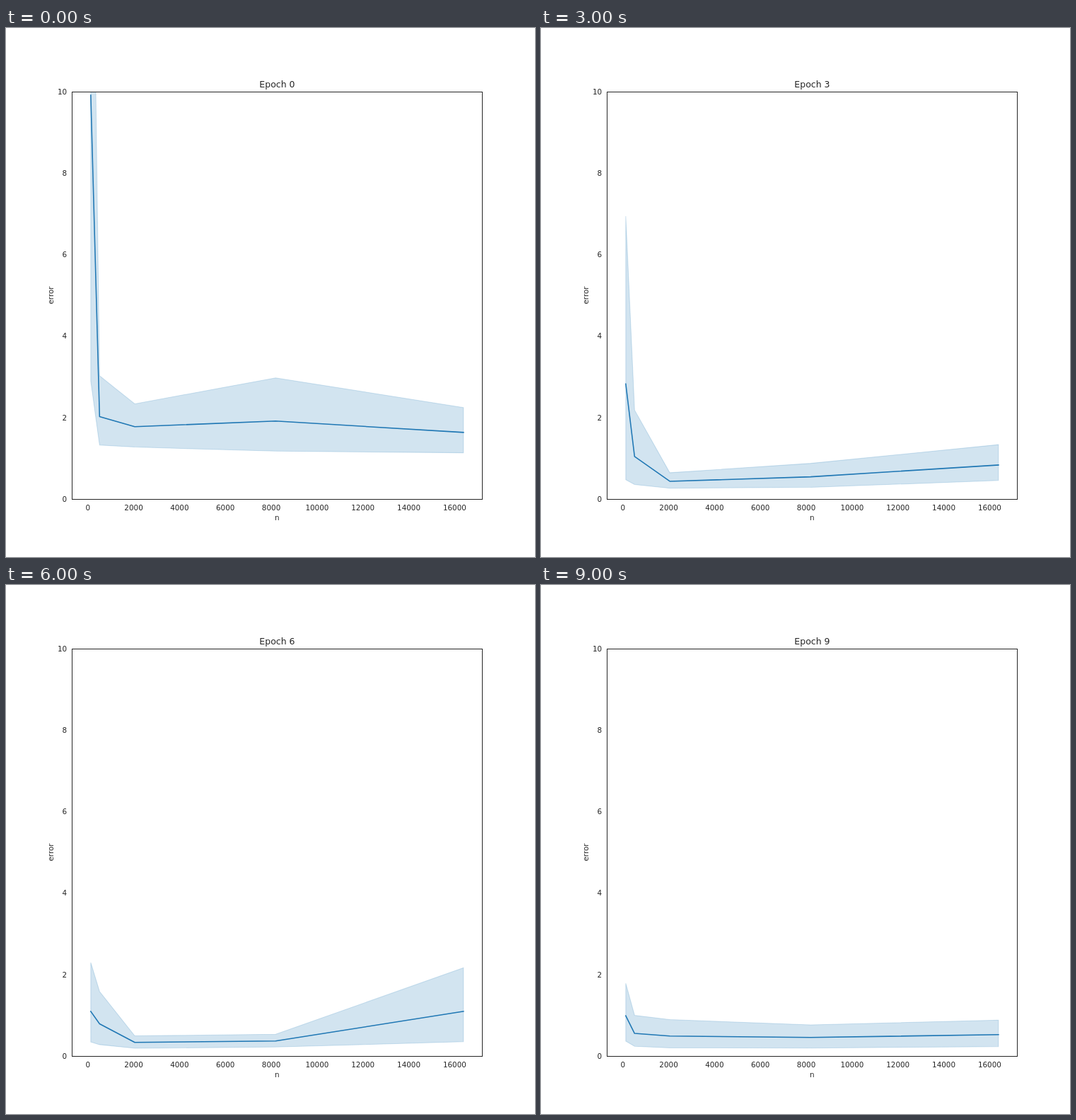
An HTML page for the animation above (10 s loop, 748 by 748 pixels).

```html
<!DOCTYPE html>
<html lang="en">
<head>
<meta charset="utf-8">
<title>Error by n</title>
<style>
  html, body { margin: 0; width: 100%; height: 100%; overflow: hidden; background: #fff; }
  svg { display: block; width: 100vw; height: 100vh; }
  text { font: 10.39px "DejaVu Sans", sans-serif; fill: #262626; text-anchor: middle; }
  text.y { text-anchor: end; }
  #title { font-size: 12.47px; }
  #band { fill: #1f77b4; stroke: #1f77b4; stroke-width: 1.04; fill-opacity: .2; stroke-opacity: .2; }
  #line { fill: none; stroke: #1f77b4; stroke-width: 1.56; stroke-linecap: square; stroke-linejoin: round; }
  #frame { fill: none; stroke: #262626; stroke-width: 1; }
</style>
</head>
<body>
<svg viewBox="0 0 748 748">
  <clipPath id="plot"><rect x="93.5" y="90" width="580" height="576"/></clipPath>
  <g clip-path="url(#plot)">
    <path id="band"/>
    <path id="line"/>
  </g>
  <rect id="frame" x="93.5" y="90.5" width="580" height="576"/>
  <g id="labels"></g>
  <text id="title" x="383.4" y="83.6"></text>
</svg>
<script>
const STEP = 1000;
const sizes = [128, 512, 2048, 8192, 16384];

// Per epoch: mean, upper bound and lower bound at each size.
const epochs = {
  0: { mean: [9.91, 2.02, 1.77, 1.91, 1.63], high: [19.5, 3.02, 2.33, 2.97, 2.24], low: [2.89, 1.32, 1.27, 1.17, 1.13] },
  1: { mean: [4.82, .89, 1.47, .72, 1.19], high: [10.7, 1.4, 2.82, 1.05, 2.25], low: [1.32, .515, .63, .45, .59] },
  2: { mean: [3.7, .97, .85, .62, 1], high: [8.7, 1.8, 1.5, .95, 1.75], low: [.8, .42, .36, .31, .5] },
  3: { mean: [2.82, 1.04, .43, .54, .83], high: [6.94, 2.18, .64, .87, 1.33], low: [.47, .35, .26, .28, .45] },
  4: { mean: [2.39, 2.53, .37, .695, 2.1], high: [5.38, 6.56, .55, 1.33, 4.89], low: [.42, .32, .22, .26, .335] },
  6: { mean: [1.09, .785, .33, .365, 1.09], high: [2.29, 1.58, .49, .53, 2.16], low: [.34, .275, .185, .215, .345] },
  7: { mean: [.915, 1.28, .345, .36, 2.245], high: [1.75, 3.01, .52, .54, 5.56], low: [.325, .29, .18, .2, .31] },
  9: { mean: [.985, .55, .485, .45, .52], high: [1.78, .995, .89, .76, .875], low: [.36, .235, .195, .19, .225] }
};

const average = (a, b) => a.map((v, i) => (v + b[i]) / 2);
const between = (a, b) => ({
  mean: average(a.mean, b.mean),
  high: average(a.high, b.high),
  low: average(a.low, b.low)
});
epochs[5] = between(epochs[4], epochs[6]);
epochs[8] = between(epochs[7], epochs[9]);

const byId = id => document.getElementById(id);
const px = n => 115.7 + n * .032419;
const py = error => 665.72 - error * 57.596;
const points = values => values.map((v, i) => [px(sizes[i]), py(v)]);
const path = list => "M" + list.map(p => p.map(c => c.toFixed(2)).join()).join("L");

function label(text, x, y, attributes = {}) {
  const node = document.createElementNS("http://www.w3.org/2000/svg", "text");
  for (const [key, value] of Object.entries({ x, y, ...attributes })) node.setAttribute(key, value);
  node.textContent = text;
  byId("labels").append(node);
}

for (let n = 0; n <= 16000; n += 2000) label(n, px(n), 681.7);
for (let e = 0; e <= 10; e += 2) label(e, 86.2, py(e) + 4, { class: "y" });
label("n", 383.4, 695.6);
label("error", 0, 0, { transform: "translate(66.6 378) rotate(-90)" });

let shown = -1;
function draw(now) {
  const epoch = Math.floor(now / STEP) % 10;
  if (epoch !== shown) {
    const { mean, high, low } = epochs[epoch];
    byId("title").textContent = "Epoch " + epoch;
    byId("line").setAttribute("d", path(points(mean)));
    byId("band").setAttribute("d", path([...points(high), ...points(low).reverse()]) + "Z");
    shown = epoch;
  }
}

const start = performance.now();
function tick() {
  draw(performance.now() - start);
  requestAnimationFrame(tick);
}
tick();
</script>
</body>
</html>
```
